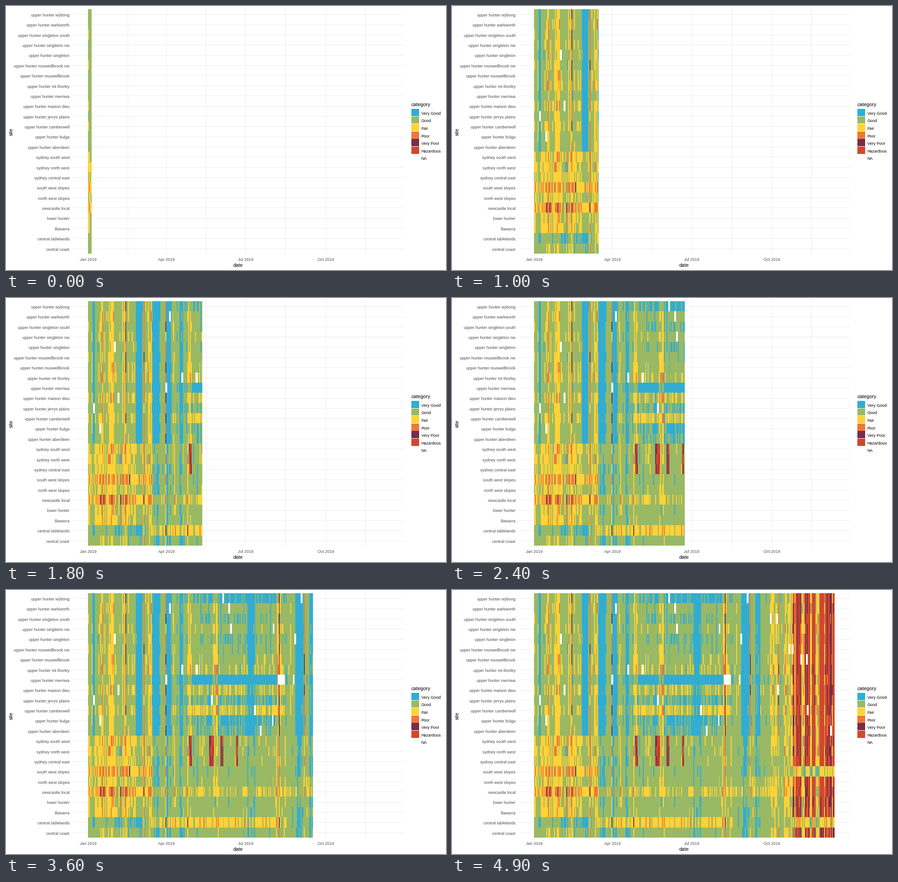
A matplotlib script for the animation above (10000 ms loop, 966x580 px).

```python
import numpy as np
import matplotlib.pyplot as plt
from matplotlib.animation import FuncAnimation
from matplotlib.colors import to_rgb
from matplotlib.patches import Rectangle

W, H, DPI = 966, 580, 64
DAYS, DAY_W = 345, 1.9115
LEFT, TOP, BOTTOM = 179.5, 7, 544
PX = 72 / DPI
plt.rcParams["font.family"] = "Liberation Sans"

LEVELS = {"Very Good": "#31add3", "Good": "#99b964", "Fair": "#ffd236",
          "Poor": "#ec783a", "Very Poor": "#782d49", "Hazardous": "#d04730",
          "NA": "#ffffff"}
NA = 6

# Weather shared by all sites, as (first day, last day)
CLEAN = [(5, 8), (55, 62), (74, 82), (90, 95), (105, 109), (183, 192),
         (238, 247), (254, 260)]
HAZY = [(14, 18), (23, 30), (39, 43), (69, 73), (97, 100), (114, 119),
        (143, 149), (216, 221), (272, 279), (287, 297)]
DUST_DAYS = [43, 64, 89, 219, 248, 280]
BURN_OFFS = [(116, 119), (139, 145), (152, 155), (170, 172)]
PLUMES = [(297, 306), (311, 316), (319, 322), (328, 345)]

# Upper Hunter sites with their local dustiness
HUNTER = {"wybong": -.6, "warkworth": -.05, "singleton south": -.25,
          "singleton nw": .15, "singleton": -.3, "muswellbrook nw": -.1,
          "muswellbrook": .2, "mt thorley": .4, "merriwa": -1,
          "maison dieu": .4, "jerrys plains": -.4, "camberwell": .6,
          "bulga": -.5, "aberdeen": -.3}
# Other sites: summer, winter and spring level, smoke strength
OTHERS = {"sydney south west": (1.75, 1.15, 1.1, 1),
          "sydney north west": (1.7, 1.1, 1.1, 1),
          "sydney central east": (1.6, 1.05, 1.05, 1),
          "south west slopes": (2.3, .9, .9, .35),
          "north west slopes": (1.55, 1.05, 1.4, 1),
          "newcastle local": (2.4, 1.4, 1.6, 1),
          "lower hunter": (1.6, 1.05, 1.1, .9),
          "illawarra": (1.6, 1.05, 1.1, .9),
          "central tablelands": (.7, 1.9, .9, .4),
          "central coast": (1.15, .9, 1, .85)}
SITES = ["upper hunter " + name for name in HUNTER] + list(OTHERS)
ROWS = len(SITES)
ROW_H = (BOTTOM - TOP) / ROWS

day = np.arange(DAYS)
rng = np.random.default_rng(2019)


def during(spells):
    return sum(((day >= a) & (day < b)).astype(float) for a, b in spells)


def seasons(summer, winter, spring):
    return np.interp(day, [0, 66, 76, 205, 235],
                     [summer, summer, winter, winter, spring])


weather = during(HAZY) * .8 - during(CLEAN)
weather[DUST_DAYS] += 2.3
winter = np.interp(day, [110, 125, 215, 232], [.3, 1, 1, .3])
burning = during(BURN_OFFS)
smoke = np.where(day >= 297, 2.4 + 2.5 * during(PLUMES), 0)
daily = rng.normal(0, 1, DAYS)
hunter_daily = rng.normal(0, 1, DAYS)


def categories(level, shared, strength):
    """Turn a mean level into daily categories; dirtier air varies more."""
    own = rng.normal(0, 1, DAYS)
    spread = .25 + .25 * np.clip(level - 1, 0, 1.5)
    value = level + spread * (.75 * shared + .65 * own)
    smoky = smoke * strength + strength * daily + .35 * own
    return np.clip(np.rint(np.where(smoke > 0, smoky, value)), 0, 5)


def make_grid():
    rows = []
    for dust in HUNTER.values():
        level = seasons(1.1, .9, 1.05) + weather + dust * winter
        row = categories(level, hunter_daily, 1)
        for start in rng.integers(0, DAYS - 3, 2):
            row[start:start + 2] = NA
        rows.append(row)
    for name, (*levels, strength) in OTHERS.items():
        level = seasons(*levels) + .5 * weather
        if name.startswith("sydney"):
            level = level + 3.4 * burning
        rows.append(categories(level, daily, strength))
    rows[SITES.index("upper hunter merriwa")][218:226] = NA
    return np.array(rows, int)


palette = np.array([to_rgb(c) for c in LEVELS.values()])
tiles = np.ones((ROWS, DAYS, 4))
tiles[..., :3] = palette[make_grid()]

fig = plt.figure(figsize=(W / DPI, H / DPI), dpi=DPI, facecolor="white")
ax = fig.add_axes([0, 0, 1, 1])


def text(x, y, s, size=8.85, color="black", **kw):
    ax.text(x, y, s, fontsize=size * PX, color=color, **kw)


def line(xs, ys):
    ax.plot(xs, ys, color="#ebebeb", lw=PX, solid_capstyle="butt", zorder=1)


for r, site in enumerate(SITES):
    y = TOP + (r + .5) * ROW_H
    line([147, 873], [y, y])
    text(139.5, y + 4.8, site, color="#4d4d4d", ha="right")

for d, label in [(0, "Jan 2019"), (90, "Apr 2019"), (181, "Jul 2019"),
                 (273, "Oct 2019")]:
    x = LEFT + (d + .5) * DAY_W
    line([x, x], [5, 546])
    line([x + 86.5, x + 86.5], [5, 546])
    text(x, 560.5, label, color="#4d4d4d", ha="center")

text(509.5, 573, "date", 11, ha="center")
text(11.5, 276, "site", 11, ha="center", va="center", rotation=90)
text(889.5, 220, "category", 11)
for i, (label, color) in enumerate(LEVELS.items()):
    y = 226 + i * 16.6
    ax.add_patch(Rectangle((889.5, y), 17, 15.8, fc=color, lw=0))
    text(911.5, y + 12.8, label)

heat = ax.imshow(tiles, extent=(LEFT, LEFT + DAYS * DAY_W, BOTTOM, TOP),
                 interpolation="nearest", aspect="auto", zorder=2)
ax.set_xlim(0, W)
ax.set_ylim(H, 0)
ax.axis("off")


def draw(k):
    shown = min(DAYS, int(4 + 7.06 * k))
    view = tiles.copy()
    view[:, shown:, 3] = 0
    heat.set_data(view)
    return [heat]


anim = FuncAnimation(fig, draw, frames=100, interval=100, repeat=True,
                     repeat_delay=0)
plt.show()
```
